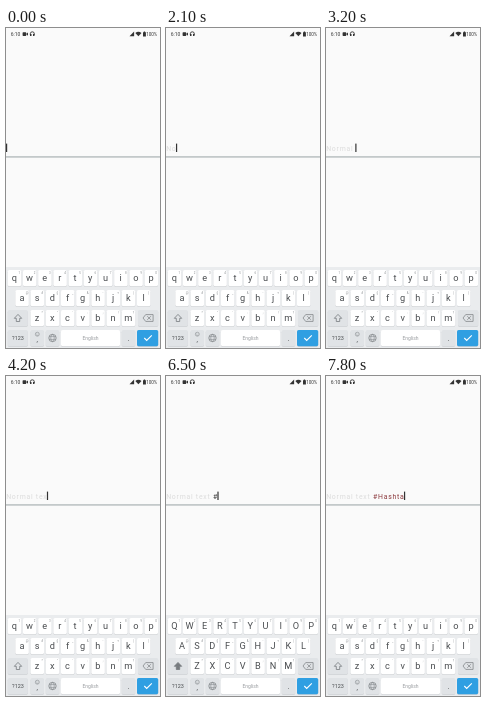
An HTML page for the animation above (8000 ms loop, 154 by 320 pixels).

```html
<!DOCTYPE html>
<html lang="en">
<head>
<meta charset="utf-8">
<title>Typing a hashtag</title>
<style>
html, body { margin: 0; width: 100%; height: 100%; overflow: hidden; background: #fafafa }
svg { display: block; width: 154px; height: 320px; font-family: Roboto, sans-serif }
text { white-space: pre }
#line { font-size: 6.9px; letter-spacing: .76px }
</style>
</head>
<body>
<svg id="stage" viewBox="0 0 154 320"></svg>
<script>
const stage = document.getElementById('stage');

function add(tag, attrs, content = '', parent = stage) {
  const el = document.createElementNS('http://www.w3.org/2000/svg', tag);
  for (const k in attrs) el.setAttribute(k, attrs[k]);
  el.textContent = content;
  parent.append(el);
  return el;
}
const rect = (x, y, width, height, fill, rx = 0, parent) =>
  add('rect', { x, y, width, height, fill, rx }, '', parent);
const label = (x, y, size, fill, s, parent) =>
  add('text', { x, y, fill, 'font-size': size, 'text-anchor': 'middle' }, s, parent);
const path = (d, stroke, width = .8, fill = 'none', parent) =>
  add('path', { d, stroke, fill, 'stroke-width': width }, '', parent);
const show = (el, on) => el.setAttribute('visibility', on ? 'visible' : 'hidden');

function keyBox(x, y, w, h, fill = '#fff') {
  rect(x, y + .7, w, h, '#d0d3d6', 1.6);
  rect(x, y, w, h, fill, 1.6);
}

// Status bar
label(9.6, 8, 5, '#333', '6:10');
rect(16.6, 4.3, 3.6, 3.6, '#333', .6);
path('M20 6.1l2-1.6v3.2z', 'none', 0, '#333');
path('M24.3 6.8v-1a2 2 0 0 1 4 0v1', '#333', .9);
path('M24 6h1.5v2h-1.5zM27 6h1.5v2h-1.5z', 'none', 0, '#333');
path('M123.5 8.2l4.6-4.6v4.6z', 'none', 0, '#333');
path('M129.3 4.9q3.1-2.4 6.2 0l-3.1 3.4z', 'none', 0, '#333');
path('M137 4.2h.8v-.7h1.3v.7h.8v4.2h-2.9z', 'none', 0, '#333');
label(145.7, 8, 4.6, '#333', '100%');

// Text field
const line = add('text', { id: 'line', x: .2, y: 122.6 });
const plain = add('tspan', { fill: '#dcdcdc' }, '', line);
const tag = add('tspan', {}, '', line);
const caret = rect(0, 115.6, 1.2, 8.4, '#333');
rect(0, 128.5, 154, .9, '#8e999c');

// Keyboard
rect(0, 239, 154, 81, '#eaecee');
const ink = '#4a4d50', soft = '#777b7f';
const keys = {};
const rows = [
  ['qwertyuiop', '1234567890', 8.5],
  ['asdfghjkl', '@#$_&-+()', 16.1],
  ['zxcvbnm', '*"\':;!?', 31.3]
];
rows.forEach(([letters, hints, left], r) => {
  [...letters].forEach((c, i) => {
    const x = left + i * 15.2, y = 242 + r * 20;
    keyBox(x - 6.7, y, 13.4, 16.2);
    const el = label(x - .2, y + 11.2, 9.2, ink, c);
    label(x + 4.9, y + 3.8, 3, '#8b8f92', hints[i]);
    keys[c] = { x, y, el };
  });
});

const grey = '#e0e3e6';
keyBox(1.8, 282, 20, 16.2, grey);
const shift = path('M12 286.4l-3.7 3.9h2v3.2h3.4v-3.2h2z', soft);
keyBox(132, 282, 20.2, 16.2, grey);
path('M137 290l2.7-3.4h7.4v6.8h-7.4zM141.3 288.2l3.6 3.6m0-3.6l-3.6 3.6', soft, .7);
keyBox(1.8, 302, 20, 16.2, grey);
label(12, 312, 5.5, ink, '?123');
keyBox(24.6, 302, 13.4, 16.2, grey);
add('circle', { cx: 31.3, cy: 306.2, r: 2, fill: 'none', stroke: soft, 'stroke-width': .5 });
path('M30.3 306.8q1 1 2 0M30.5 305.5v.3M32 305.5v.3', soft, .5);
label(31.3, 314.2, 7, ink, ',');
keyBox(39.8, 302, 13.4, 16.2, grey);
add('circle', { cx: 46.5, cy: 310, r: 3.7, fill: 'none', stroke: soft, 'stroke-width': .7 });
path('M46.5 306.3q-3.6 3.7 0 7.4q3.6-3.7 0-7.4M43.2 308.6h6.6M43.2 311.4h6.6', soft, .5);
keyBox(55, 302, 59, 16.2);
label(84.5, 312, 5, '#9a9da0', 'English');
keyBox(115.8, 302, 13.4, 16.2, grey);
label(122.5, 313, 8, ink, '.');
keyBox(131, 302, 21.2, 16.2, '#2f9fe2');
path('M138.3 310l2.4 2.5 5.1-5.1', '#fff', 1.1);

// Key preview and long-press panel
const popup = add('g', {});
rect(-8.1, -.3, 16.2, 45.2, '#d4d7d9', 2.2, popup);
rect(-7.7, -.5, 15.4, 44.7, '#fff', 2, popup);
const popupText = label(0, 16, 11, ink, '', popup);
const panel = add('g', {});
rect(20.2, 234, 36, 21.5, '#d4d7d9', 2, panel);
rect(20.5, 234, 35.4, 21, '#fff', 2, panel);
rect(22, 235.5, 16, 18, '#2f9fe2', 2, panel);
label(30, 248, 10, '#fff', '#', panel);
label(46.5, 248, 10, ink, 'ß', panel);

// Time, text so far, pressed key, mode (o: caret off, c: capitals, l: long press, r: red tag)
const full = 'Normal text #Hashta';
const steps = [
  [0, 0], [500, 0, '', 'o'], [1100, 0], [1400, 0, '', 'c'], [1500, 0, '', 'co'],
  [1700, 0, 'n', 'c'], [1800, 1], [2000, 1, 'o'], [2100, 2], [2300, 2, 'r'], [2400, 3],
  [2600, 3, 'm'], [2700, 5], [2900, 5, 'l'], [3000, 6], [3200, 7], [3300, 7, 't'],
  [3600, 8], [3800, 8, 'e'], [3900, 9], [4100, 9, 'x'], [4200, 10], [4400, 10, 't'],
  [4500, 11], [4700, 12], [5100, 12, '', 'o'], [5700, 12, 's'], [6000, 12, 's', 'l'],
  [6200, 13], [6500, 13, '', 'c'], [6800, 13, 'h', 'c'], [6900, 15], [7100, 15, 's'],
  [7200, 16], [7400, 17, 'h'], [7700, 18, '', 'r'], [7800, 19, '', 'r']
];

let last;
function draw(now) {
  const t = now % 8000;
  const step = steps.findLast(s => s[0] <= t);
  if (step !== last) {
    last = step;
    const [, count, key = '', mode = ''] = step;
    const caps = mode.includes('c');
    const face = c => caps ? c.toUpperCase() : c;
    plain.textContent = full.slice(0, Math.min(count, 12));
    tag.textContent = full.slice(12, count);
    tag.setAttribute('fill', mode.includes('r') ? '#8c3a3e' : '#3c3c3c');
    caret.setAttribute('x', count ? line.getComputedTextLength() - .4 : 0);
    show(caret, !mode.includes('o'));
    for (const c in keys) keys[c].el.textContent = face(c);
    shift.setAttribute('fill', caps ? soft : 'none');
    show(popup, key);
    show(panel, mode.includes('l'));
    if (key) {
      const { x, y } = keys[key];
      popup.setAttribute('transform', `translate(${x} ${y - 27.5})`);
      popupText.textContent = mode.includes('l') ? '' : face(key);
    }
  }
}
const start = performance.now();
function tick() {
  draw(performance.now() - start);
  requestAnimationFrame(tick);
}
tick();
</script>
</body>
</html>
```
